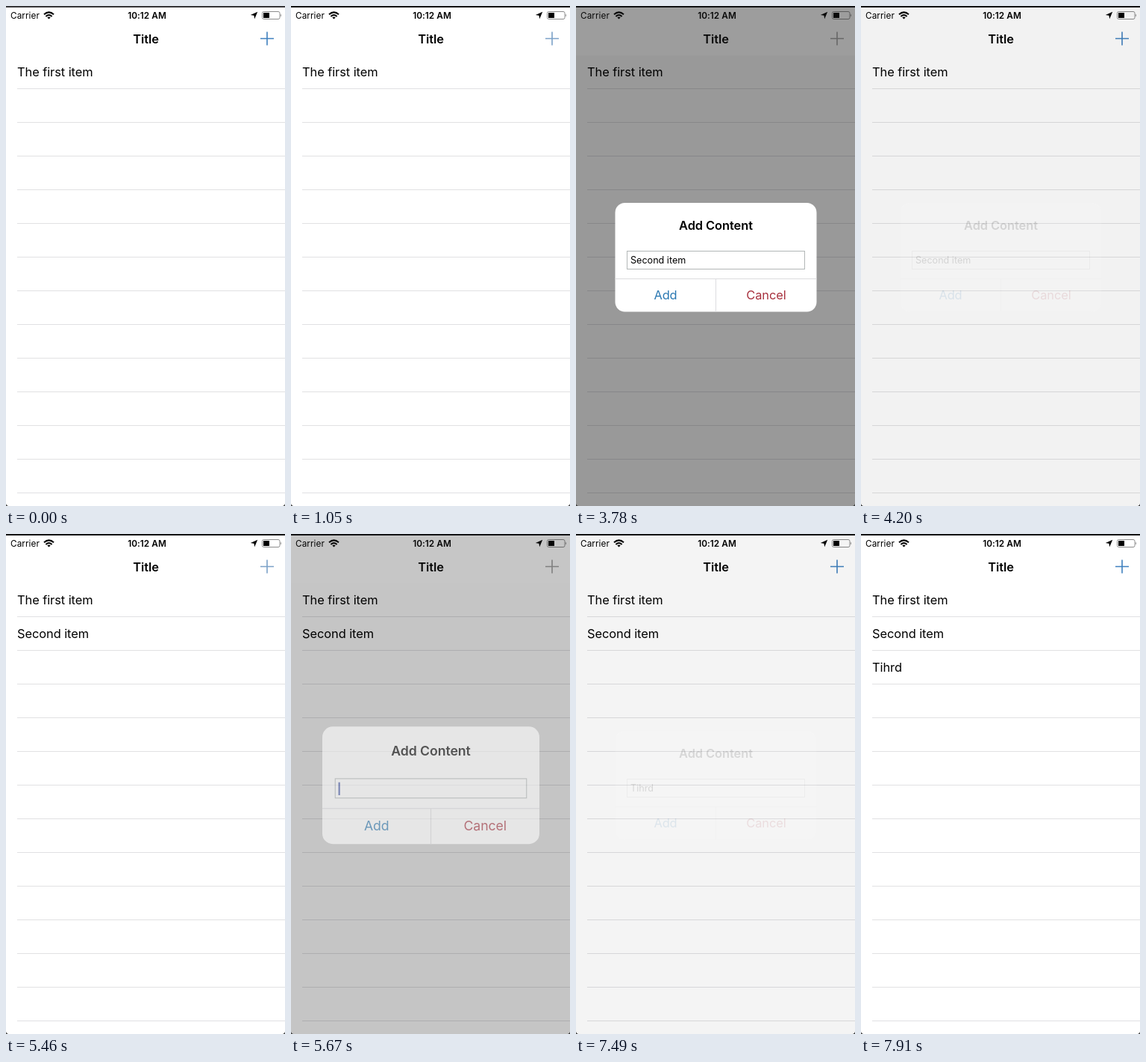
An HTML page for the animation above (8000 ms loop, 374 px wide and 668 px high).

```html
<!DOCTYPE html>
<html lang="en">
<head>
<meta charset="utf-8">
<title>List with prompt</title>
<style>
  html, body { margin: 0; width: 100%; height: 100%; overflow: hidden; background: #fff; }
  svg { display: block; width: 374px; height: 668px; }
  text { font: 16.4px Inter, "Liberation Sans", sans-serif; letter-spacing: -.06px; white-space: pre; }
  .bold { font-weight: 600; }
  .mid { text-anchor: middle; }
  .status { font-size: 11.8px; letter-spacing: .05px; }
  .field { font-size: 12.6px; letter-spacing: 0; }
</style>
</head>
<body>
<svg viewBox="0 0 374 668">
  <rect width="374" height="668" fill="#fff"/>
  <path id="rules" stroke="#e1e1e3"/>
  <g id="rows"></g>

  <text class="status" x="6" y="17">Carrier</text>
  <g fill="none" stroke="#000" stroke-width="2">
    <path d="M51 11.3Q57.5 5.5 64 11.3M53.4 13.9Q57.5 10.2 61.6 13.9"/>
    <path d="M57.5 17.6l-2.2-2.3q2.2-1.7 4.4 0z" fill="#000" stroke="none"/>
  </g>
  <text class="status bold mid" x="189" y="17">10:12 AM</text>
  <path d="M337.2 7.8L333.2 17.2L332.4 12.7L327.8 12z"/>
  <rect x="343.5" y="7.5" width="23.5" height="10" rx="2" fill="none" stroke="#8c8c8c"/>
  <rect x="345" y="9" width="8" height="7"/>
  <path d="M368 10.5q2 2 0 4z" fill="#8c8c8c"/>
  <text class="bold mid" x="187.5" y="50">Title</text>
  <path id="plus" d="M341 43.5h18M350 34.5v18" stroke-width="1.6"/>

  <rect id="dim" y="2" width="374" height="666"/>
  <rect id="navTint" y="2" width="374" height="64" fill="#fff"/>

  <g id="dialog">
    <rect x="52.5" y="263" width="270" height="145.5" rx="13" fill="#fff"/>
    <text class="bold mid" x="187.5" y="299">Add Content</text>
    <rect x="68.5" y="327.5" width="238" height="24" fill="#fff" stroke="#b2b7b7"/>
    <text id="input" class="field" x="73" y="344"></text>
    <rect id="caret" y="332" width="2" height="16" fill="#4358a8"/>
    <path d="M52.5 364.5h270M187.5 364.5v44" stroke="#dcdcdf"/>
    <text class="mid" x="120" y="392" fill="#2a78b2">Add</text>
    <text class="mid" x="255" y="392" fill="#a8323f">Cancel</text>
  </g>

  <rect id="topEdge" width="374" height="2"/>
  <path d="M0 665v3h3q-2.500-.5-3-3zM374 665v3h-3q2.500-.5 3-3z" fill="#333"/>
</svg>
<script>
const LOOP = 8000, OPEN_MS = 430, CLOSE_MS = 480, ADD_DELAY = 575;

// caretOff: [fade start, hidden until]; keys: time of each typed letter
const prompts = [
  { press: 980, open: 1150, close: 3825, text: 'Second item',
    keys: [2100, 2170, 2240, 2310, 2450, 2520, 2660, 2800, 2940, 3080, 3220],
    caretOff: [[1750, 2030], [3650, 4400]] },
  { press: 5460, open: 5565, close: 7110, text: 'Tihrd',
    keys: [6090, 6230, 6300, 6440, 6580],
    caretOff: [[6850, 7700]] }
];

const el = id => document.getElementById(id);
const set = (id, attrs) => {
  for (const name in attrs) el(id).setAttribute(name, attrs[name]);
};
const clamp = v => Math.min(1, Math.max(0, v));
const easeOut = v => 1 - (1 - clamp(v)) ** 3;
const easeInOut = v => { v = clamp(v); return v * v * (3 - 2 * v); };

let rules = '';
for (let y = 110.5; y < 668; y += 45) rules += `M15 ${y}H374`;
set('rules', { d: rules });

const rows = ['The first item', ...prompts.map(p => p.text)].map((label, i) => {
  const row = document.createElementNS('http://www.w3.org/2000/svg', 'text');
  row.setAttribute('x', 15);
  row.setAttribute('y', 94 + 45 * i);
  row.textContent = label;
  return el('rows').appendChild(row);
});

function caretOpacity(prompt, t) {
  for (const [from, until] of prompt.caretOff) {
    if (t >= from && t < until) return 1 - clamp((t - from) / 130);
  }
  return 1;
}

function draw(t) {
  const prompt = t < 5000 ? prompts[0] : prompts[1];
  const shown = easeOut((t - prompt.open) / OPEN_MS);
  const hidden = easeInOut((t - prompt.close) / CLOSE_MS);
  const visible = shown * (1 - hidden);

  prompts.forEach((p, i) => {
    rows[i + 1].style.display = t >= p.close + ADD_DELAY ? '' : 'none';
  });

  const active = t >= prompt.open && t < prompt.close;
  const pressed = t >= prompt.press && t < prompt.open;
  set('plus', { stroke: active ? '#a0a0a0' : pressed ? '#7ba1c8' : '#3f80bf' });
  set('topEdge', { fill: t < 980 ? '#38383b' : '#141416' });
  set('dim', { opacity: 0.4 * visible });
  set('navTint', { opacity: 0.04 * visible });

  const scale = 1 + 0.18 * (1 - shown);
  set('dialog', {
    opacity: visible,
    transform: `translate(187.5 335.5) scale(${scale}) translate(-187.5 -335.5)`
  });

  const input = el('input');
  input.textContent = prompt.text.slice(0, prompt.keys.filter(k => t >= k).length);
  set('caret', {
    x: 72.5 + input.getComputedTextLength(),
    opacity: caretOpacity(prompt, t)
  });
}

let start;
function frame(now) {
  start ??= now;
  draw((now - start) % LOOP);
  requestAnimationFrame(frame);
}
draw(0);
requestAnimationFrame(frame);
</script>
</body>
</html>
```
